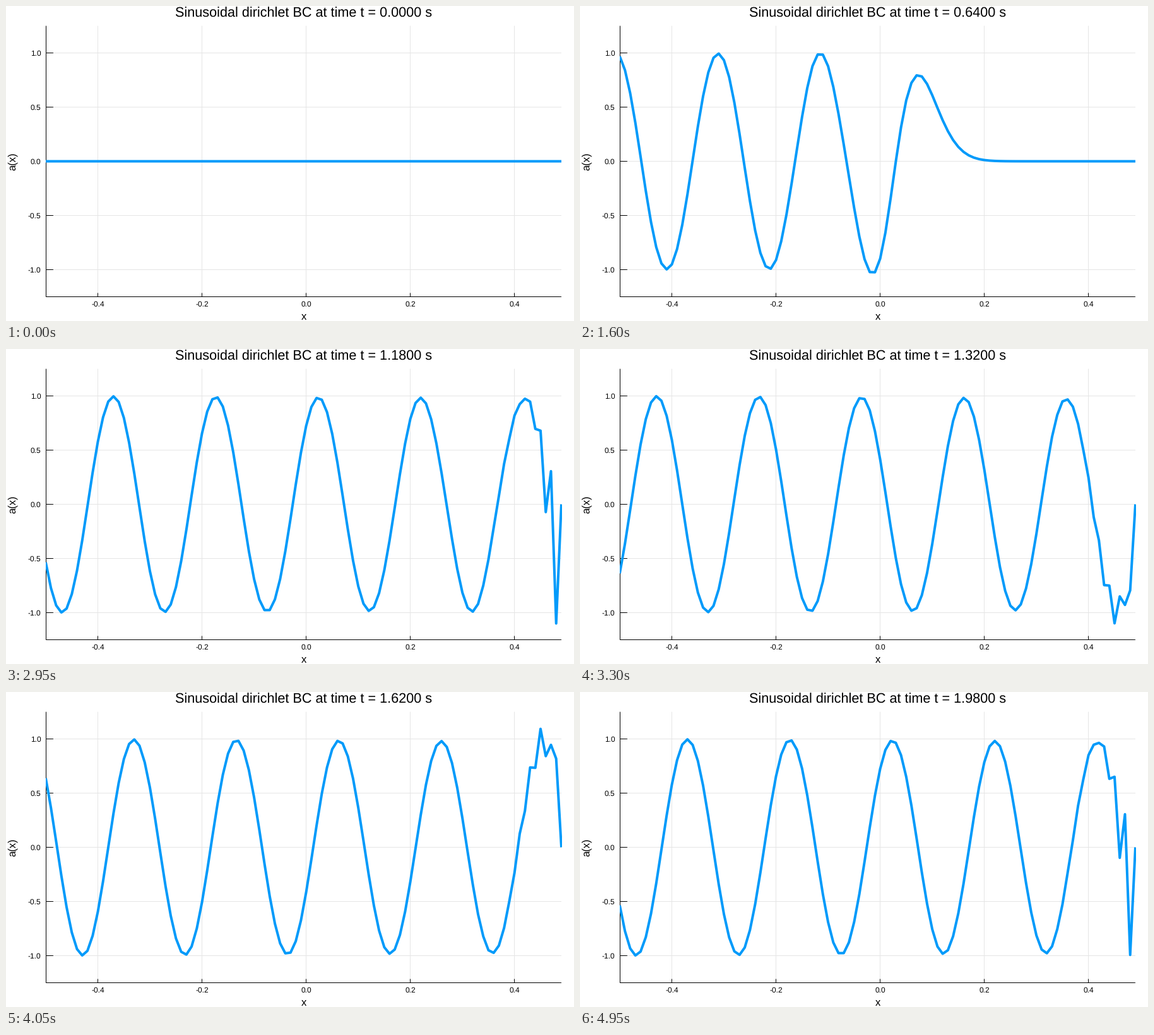
A matplotlib script that plays this animation: 900 px wide and 500 px high, repeating every 5 s.

```python
import matplotlib.pyplot as plt
import numpy as np
from matplotlib.animation import FuncAnimation
from matplotlib.patches import Rectangle

W, H, DPI = 900, 500, 100
PT = 72 / DPI                      # points per pixel
LEFT, RIGHT, TOP, BOTTOM = 63, 880, 31.5, 461.5
FRAMES, INTERVAL = 100, 50

# Advection equation, Lax-Wendroff scheme
DX, DT, STEPS = 0.01, 0.002, 10
OMEGA = 10 * np.pi
C = DT / DX
x = -0.5 + DX * np.arange(100)


def solve():
    """States of the wave, one per frame: sine inflow, zero at the right end."""
    u = np.zeros_like(x)
    states = [u.copy()]
    for n in range(1, (FRAMES - 1) * STEPS + 1):
        left, mid, right = u[:-2], u[1:-1], u[2:]
        inner = mid - C / 2 * (right - left) + C**2 / 2 * (right - 2 * mid + left)
        u[1:-1] = inner
        u[0] = np.sin(OMEGA * (n + 1) * DT)
        u[-1] = 0
        if n % STEPS == 0:
            states.append(u.copy())
    return states


def px(v):
    return LEFT + (v + 0.5) * (RIGHT - LEFT) / 0.99


def py(v):
    return (TOP + BOTTOM) / 2 - v * (BOTTOM - TOP) / 2.5


def mid_pixel(v):
    return np.floor(v) + 0.5


plt.rcParams["font.family"] = "Liberation Sans"
plt.rcParams["text.hinting"] = "none"

fig = plt.figure(figsize=(W / DPI, H / DPI), dpi=DPI, facecolor="white")
ax = fig.add_axes([0, 0, 1, 1])
ax.set_xlim(0, W)
ax.set_ylim(H, 0)
ax.axis("off")


def rule(x0, y0, x1, y1, color="black", z=2):
    ax.plot([x0, x1], [y0, y1], color=color, lw=PT, zorder=z,
            solid_capstyle="butt", snap=False)


def label(tx, ty, s, size, **kw):
    kw = {"ha": "center", "va": "baseline", **kw}
    return ax.text(tx, ty, s, fontsize=size * PT, color="black", **kw)


GRID = "#e5e5e5"
for v in (-0.4, -0.2, 0.0, 0.2, 0.4):
    gx = mid_pixel(px(v))
    rule(gx, TOP, gx, BOTTOM, GRID, 1)
    rule(gx, BOTTOM, gx, BOTTOM - 6)
    label(px(v), 477, f"{v:.1f}", 12)
for v in (-1.0, -0.5, 0.0, 0.5, 1.0):
    gy = mid_pixel(py(v))
    rule(LEFT, gy, RIGHT, gy, GRID, 1)
    rule(LEFT, gy, LEFT + 12, gy)
    label(55.5, gy + 4.5, f"{v:.1f}", 12, ha="right")

rule(LEFT + 0.5, TOP, LEFT + 0.5, BOTTOM + 0.5)
rule(LEFT, BOTTOM, RIGHT, BOTTOM)
label(472, 498, "x", 16.6)
label(14.5, 246.5, "a(x)", 16.6, rotation=90, rotation_mode="anchor")
title = label(472, 18, "", 21.6)

wave, = ax.plot([], [], color="#009afa", lw=4 * PT, zorder=3, snap=False,
                solid_joinstyle="round", solid_capstyle="butt")
wave.set_clip_path(Rectangle((LEFT, TOP), RIGHT - LEFT + 0.5, BOTTOM - TOP,
                             transform=ax.transData))

states = solve()


def draw(i):
    wave.set_data(px(x), py(states[i]))
    title.set_text(f"Sinusoidal dirichlet BC at time t = {i * STEPS * DT:.4f} s")
    return wave, title


anim = FuncAnimation(fig, draw, frames=FRAMES, interval=INTERVAL,
                     repeat=True, repeat_delay=0)
plt.show()
```
